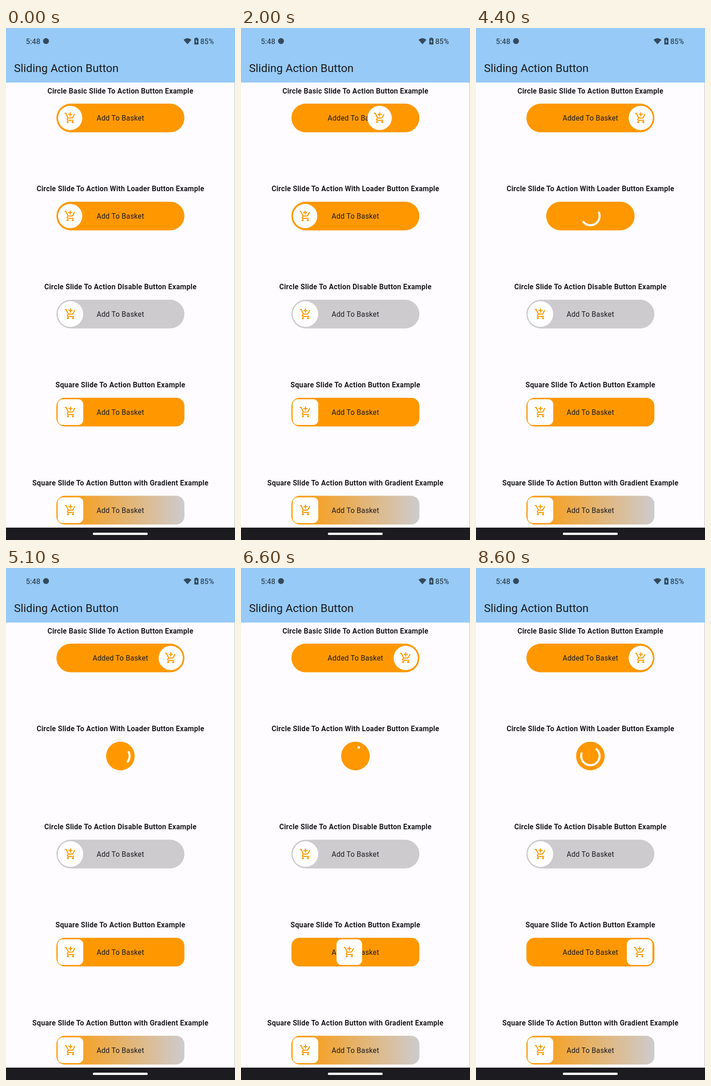
Recreate the animation shown at these times as an HTML page. Size 501 by 1117 pixels, loop 8700 ms.

```html
<!DOCTYPE html>
<html lang="en">
<head>
<meta charset="utf-8">
<title>Sliding Action Button</title>
<style>
  html, body { margin: 0; width: 100%; height: 100%; overflow: hidden; background: #fefcff; }
  svg { display: block; font-family: Roboto, sans-serif; fill: #1c1b1f; }
  .caption, .label { font-size: 15.66px; letter-spacing: .28px; text-anchor: middle; }
  .caption { font-weight: 700; }
  .status { font-size: 16px; font-weight: 500; fill: #34495c; }
  .cart { fill: none; stroke: #ff9800; stroke-width: 2; }
  .wheel { fill: #ff9800; }
</style>
</head>
<body>
<svg id="stage" width="501" height="1117" viewBox="0 0 501 1117">
  <defs>
    <linearGradient id="fade"><stop stop-color="#ff9800"/><stop offset="1" stop-color="#cdcbce"/></linearGradient>
    <g id="icon" transform="scale(1.119) translate(-12 -12)">
      <path class="cart" d="M12 1v8M8 5h8M1 3h2.63l4.26 9h8.1q.3 0 .6-.5l4-7.2M7.6 12l-1.5 2.7q-.6 1.3 .9 1.8H19"/>
      <circle class="wheel" cx="7" cy="20" r="2"/><circle class="wheel" cx="17" cy="20" r="2"/>
    </g>
  </defs>
  <rect width="501" height="119" fill="#97caf6"/>
  <g class="status">
    <text x="43.5" y="34.5">5:48</text>
    <circle cx="87.5" cy="28.5" r="6.5"/>
    <path d="M388.5 26Q397 18.5 405.500 26L397 35.500Z"/>
    <path d="M414.500 21h4v1.500h2.500v13.500h-9v-13.500h2.500z"/>
    <path d="M417 24.500l-3 5.500h2v4l3-5.500h-2z" fill="#97caf6"/>
    <text x="425" y="34.5">85%</text>
  </g>
  <text x="17.500" y="95.500" font-size="24.600">Sliding Action Button</text>
  <g id="rows"></g>
  <rect x="500" y="119" width="1" height="971" fill="#bdbbbe"/>
  <rect y="1090" width="501" height="27"/>
  <rect x="190" y="1101" width="120" height="5" rx="2.500" fill="#fff"/>
</svg>
<script>
const LOOP = 8700, STEP = 100, CENTER = 250.3, WIDTH = 280, HEIGHT = 62.6, PITCH = 213.9;
const LOAD_START = 4125, SHRINK_TIME = 690;
const clamp = x => Math.min(1, Math.max(0, x));
const smooth = x => x * x * (3 - 2 * x);

// from/to: knob centre; keys: [time, progress] pairs of the drag
const circle = { radius: 31.3, knob: 53, knobRadius: 26.5, from: 140.4, to: 360.4 };
const square = { radius: 17.9, knob: 56, knobRadius: 11, from: 141, to: 358 };
const buttons = [
  { ...circle, title: 'Circle Basic Slide To Action Button Example', keys: [[900, 0], [2550, 1]] },
  { ...circle, title: 'Circle Slide To Action With Loader Button Example', keys: [[3800, 0], [LOAD_START, 1]], loads: true },
  { ...circle, title: 'Circle Slide To Action Disable Button Example', fill: '#cdcbce', knob: 56, knobRadius: 28, from: 141 },
  { ...square, title: 'Square Slide To Action Button Example', keys: [[5200, 0], [5800, .696], [6600, .442], [7400, 1]] },
  { ...square, title: 'Square Slide To Action Button with Gradient Example', fill: 'url(#fade)' },
];

function progress(keys, t) {
  let value = 0;
  keys.forEach(([time, level], i) => {
    if (!i || t < keys[i - 1][0]) return;
    const [start, base] = keys[i - 1];
    value = base + (level - base) * smooth(clamp((t - start) / (time - start)));
  });
  return value;
}

// cubic-bezier(.4, 0, .2, 1)
function fastOutSlowIn(x) {
  let low = 0, high = 1;
  for (let i = 0; i < 20; i++) {
    const s = (low + high) / 2, r = 1 - s;
    if (1.2 * r * r * s + .6 * r * s * s + s ** 3 < x) low = s; else high = s;
  }
  return smooth(low);
}

function spinnerPath(elapsed, cy) {
  const cycle = elapsed / 1333 % 1, arc = 1.5 * Math.PI, radius = 20.1;
  const head = fastOutSlowIn(clamp(cycle * 2)) * arc;
  const tail = fastOutSlowIn(clamp(cycle * 2 - 1)) * arc;
  const start = -Math.PI / 2 + tail + elapsed / 2222 * 2 * Math.PI + cycle * Math.PI / 2;
  const sweep = Math.max(head - tail, .001);
  const point = a => `${CENTER + radius * Math.cos(a)} ${cy + radius * Math.sin(a)}`;
  return `M${point(start)}A${radius} ${radius} 0 ${+(sweep > Math.PI)} 1 ${point(start + sweep)}`;
}

const rows = document.getElementById('rows');
rows.innerHTML = buttons.map((b, i) => {
  const top = 165 + PITCH * i, middle = top + HEIGHT / 2;
  return `<g>
    <text class="caption" x="${CENTER}" y="${top - 22.5}">${b.title}</text>
    <rect class="track" x="${CENTER - WIDTH / 2}" y="${top}" width="${WIDTH}" height="${HEIGHT}" rx="${b.radius}" fill="${b.fill || '#ff9800'}"/>
    <g class="content">
      <text class="label" x="${CENTER}" y="${middle + 5.8}">Add To Basket</text>
      <g class="knob" transform="translate(${b.from} ${middle})">
        <rect x="${-b.knob / 2}" y="${-b.knob / 2}" width="${b.knob}" height="${b.knob}" rx="${b.knobRadius}" fill="#fff"/>
        <use href="#icon"/>
      </g>
    </g>
    <path class="spinner" fill="none" stroke="#fff" stroke-width="4.5"/>
  </g>`;
}).join('');

function draw(t) {
  buttons.forEach((b, i) => {
    if (!b.keys) return;
    const part = name => rows.children[i].querySelector('.' + name);
    const middle = 165 + PITCH * i + HEIGHT / 2, p = progress(b.keys, t);
    part('knob').setAttribute('transform', `translate(${b.from + (b.to - b.from) * p} ${middle})`);
    part('label').textContent = p > .5 ? 'Added To Basket' : 'Add To Basket';
    if (!b.loads) return;
    const elapsed = t - LOAD_START, loading = elapsed >= 0;
    const width = WIDTH + (HEIGHT - WIDTH) * clamp(elapsed / SHRINK_TIME);
    part('track').setAttribute('width', width);
    part('track').setAttribute('x', CENTER - width / 2);
    part('content').setAttribute('visibility', loading ? 'hidden' : 'visible');
    part('spinner').setAttribute('d', loading ? spinnerPath(elapsed, middle) : '');
  });
}

const begin = performance.now();
function tick() {
  const t = (performance.now() - begin) % LOOP;
  draw(Math.floor(t / STEP) * STEP);
  requestAnimationFrame(tick);
}
tick();
</script>
</body>
</html>
```
